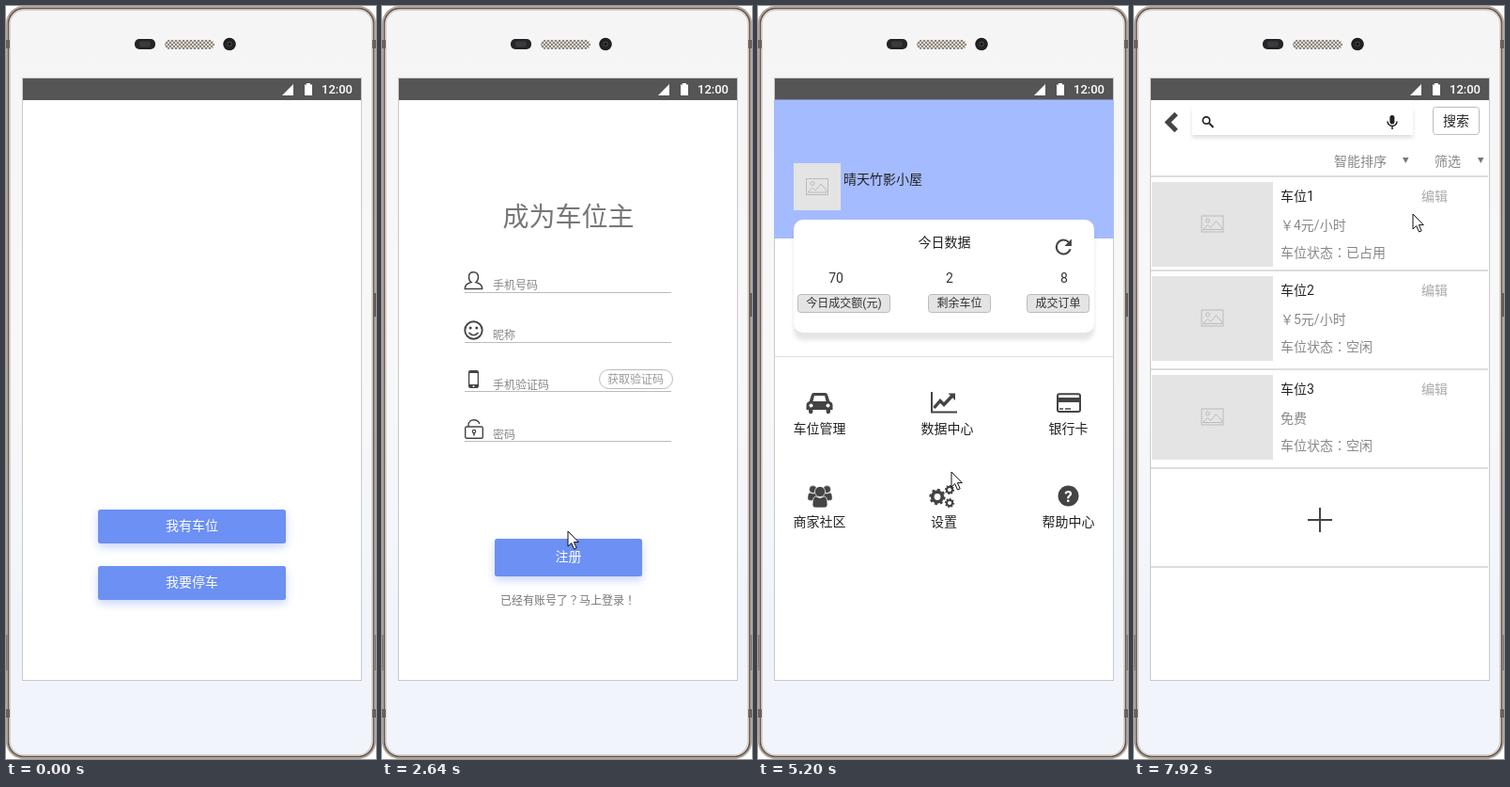
Recreate the animation shown at these times as an HTML page. Size 394x800 px, loop 8 s.

```html
<!DOCTYPE html>
<html lang="zh-CN">
<head>
<meta charset="utf-8">
<title>车位应用演示</title>
<style>
html, body { margin: 0; height: 100%; overflow: hidden; background: #fff; }
svg { display: block; width: 100vw; height: 100vh; }
text { font-family: Roboto, "Noto Sans CJK SC", "Noto Sans CJK", sans-serif; }
.mid { font-family: "Noto Sans CJK TC", "Noto Sans CJK", sans-serif; }
.button { filter: drop-shadow(0 4px 5px #6c90f360); }
.raised { filter: drop-shadow(0 3px 2px #0002); }
.card { filter: drop-shadow(0 8px 2px #0000001a); }
</style>
</head>
<body>
<svg id="stage" viewBox="0 0 394 800" preserveAspectRatio="none"></svg>
<script>
const INK = '#444', GREY = '#777', PALE = '#bbb';

// Text is placed by its vertical centre; wide punctuation sits mid-cell.
const text = (x, cy, value, size = 14, fill = '#222', more = '') =>
  `<text x="${x}" y="${cy + size * 0.37}" font-size="${size}" fill="${fill}" ${more}>` +
  value.replace(/[？！：]/g, '<tspan class="mid" lang="zh-TW">$&</tspan>') + '</text>';
const centered = (x, cy, value, size, fill, more = '') =>
  text(x, cy, value, size, fill, `text-anchor="middle" ${more}`);
const title = value => centered(198.5, 224, value, 28, GREY, 'font-weight="500"');
const rect = (x, y, w, h, fill, more = '') =>
  `<rect x="${x}" y="${y}" width="${w}" height="${h}" fill="${fill}" ${more}/>`;
const circle = (x, y, r, fill, more = '') =>
  `<circle cx="${x}" cy="${y}" r="${r}" fill="${fill}" ${more}/>`;
const stroke = (d, color = INK, width = 1, more = '') =>
  `<path d="${d}" fill="none" stroke="${color}" stroke-width="${width}" ${more}/>`;
const shape = (d, fill = INK, more = '') => `<path d="${d}" fill="${fill}" ${more}/>`;
const at = (x, y, content, scale = 1) =>
  `<g transform="translate(${x} ${y}) scale(${scale})">${content}</g>`;
const rule = (x1, x2, y, color = PALE, width = 1) => stroke(`M${x1} ${y}H${x2}`, color, width);
const button = (x, y, w, h, label) =>
  rect(x, y, w, h, '#6c90f3', 'rx="2.5" class="button"') +
  centered(x + w / 2, y + h / 2 - 0.8, label, 14, '#fff', 'font-weight="500"');

const user = (x, y) => at(x, y,
  stroke('M10 .8C6.5 .8 5 3.2 5 6C5 8.500 6.200 10.600 7.500 11.500C3.500 12.500 .8 14.500 .8 18.500H19.200C19.200 14.500 16.500 12.500 12.500 11.500C13.800 10.600 15 8.500 15 6C15 3.200 13.500 .8 10 .8Z', INK, 1.5));
const lock = (x, y) => at(x, y,
  rect(0.7, 8, 18.6, 12.3, 'none', `rx="1.5" stroke="${INK}" stroke-width="1.4"`) +
  stroke('M4 8V6.500C4 2.500 6.500 .8 9.500 .8C13 .8 15.200 2.500 15.800 5', INK, 1.4) +
  circle(10, 13, 1.7, 'none', `stroke="${INK}" stroke-width="1.2"`) + stroke('M10 14.500V17.500', INK, 1.6));
const smiley = (x, y) => at(x, y,
  circle(0, 0, 9.2, 'none', `stroke="${INK}" stroke-width="1.9"`) +
  circle(-3.3, -2.5, 1.5, INK) + circle(3.3, -2.5, 1.5, INK) + stroke('M-5 2.500Q0 8 5 2.500', INK, 1.7));
const handset = (x, y) =>
  rect(x, y, 11, 19, INK, 'rx="2"') + rect(x + 1.3, y + 3, 8.4, 12, '#fff') + circle(x + 5.5, y + 17, 1, '#fff');
const picture = (x, y) => at(x, y,
  rect(0.5, 0.5, 23, 17, 'none', 'stroke="#bbb"') + circle(7, 5.5, 2, 'none', 'stroke="#bbb"') +
  stroke('M2 15L7 10L10 13L16 6L22 13V15Z', '#bbb'));
const car = (x, y) => at(x, y,
  shape('M8 0H20Q22 0 22.600 2L24.800 9Q28 10 28 13V18H25.500V20a2.200 2.200 0 0 1-4.400 0V18H6.900V20a2.200 2.200 0 0 1-4.400 0V18H0V13Q0 10 3.200 9L5.400 2Q6 0 8 0ZM8.500 3L7 9H21L19.500 3Z', INK, 'fill-rule="evenodd"') +
  circle(5, 13.5, 2, '#fff') + circle(23, 13.5, 2, '#fff'));
const gear = (x, y, r) =>
  circle(x, y, r * 0.62, 'none', `stroke="${INK}" stroke-width="${r * 0.44}"`) +
  circle(x, y, r * 0.88, 'none', `stroke="${INK}" stroke-width="${r * 0.28}" pathLength="16" stroke-dasharray="1 1"`);
const person = (x, y, s) => at(x, y,
  circle(0, 0, 5.6, INK, 'stroke="#fff" stroke-width=".7"') +
  shape('M-5 5Q0 8 5 5Q8 6 8 14Q8 17 5 17H-5Q-8 17-8 14Q-8 6-5 5Z', INK, 'stroke="#fff" stroke-width=".7"'), s);

function phone() {
  const mark = y => rect(0, y, 4, 9, '#6b625c') + rect(390, y, 4, 9, '#6b625c');
  const edge = (inset, radius, color, width) =>
    rect(inset, inset, 394 - 2 * inset, 800 - 2 * inset, 'none', `rx="${radius}" stroke="${color}" stroke-width="${width}"`);
  return `<defs>
    <linearGradient id="body" x2="0" y2="1"><stop stop-color="#f5f5f5"/><stop offset=".45" stop-color="#f8f8f8"/><stop offset=".8" stop-color="#f1f5fb"/></linearGradient>
    <pattern id="mesh" width="4" height="4" patternUnits="userSpaceOnUse"><circle cx="1" cy="1" r=".9" fill="#645c56"/><circle cx="3" cy="3" r=".9" fill="#645c56"/></pattern></defs>` +
    rect(1, 1, 392, 798, 'url(#body)', 'rx="17"') +
    edge(0.8, 18, '#b5a89c', 1.8) + edge(2.6, 16, '#62574f', 1.8) + edge(4.2, 15, '#d9d0c7', 1.4) +
    mark(36) + mark(747) + rect(392, 305, 2, 25, '#655e58') + rect(0, 668, 1.5, 38, '#827a75') + rect(392.5, 668, 1.5, 38, '#827a75') +
    rect(137, 35, 22, 11, '#252527', 'rx="5"') + rect(142, 37.5, 12, 6, '#3a3a3d', 'rx="2"') +
    rect(169, 36, 53, 10, '#e2dcd6', 'rx="5"') + rect(169, 36, 53, 10, 'url(#mesh)', 'rx="5"') +
    circle(238, 40.5, 6.8, '#202022') + circle(238, 40.5, 3, '#3c3c40') + circle(238, 40.5, 1.4, '#111') +
    rect(17.5, 76.5, 361, 640, '#fff', 'stroke="#c9c9c9"') + rect(18, 77, 360, 23, '#555') +
    shape('M294 95H306V83Z', '#fff') + shape('M318 83.500H320V82H324V83.500H326V95H318Z', '#fff') +
    text(336, 88.5, '12:00', 13, '#fff', 'font-weight="500"');
}

const home = () => button(98, 535, 200, 36, '我有车位') + button(98, 595, 200, 36, '我要停车');

const login = () =>
  title('车位主登录') +
  user(83.5, 288) + text(118, 297.5, '账号/手机号码', 12, '#888') + rule(116, 308, 305.5) +
  lock(84, 350) + text(118, 360.5, '密码', 12, '#888') + rule(116, 308, 369.5) +
  text(256, 380, '忘记密码', 12, GREY) +
  button(120, 485, 157, 40, '登录') + text(134, 552.5, '还没有账号？马上注册！', 12, GREY) +
  rule(48, 358, 633.5, '#c4c4c4') + text(150, 648.5, '使用以下账号登录', 12, GREY) +
  [112, 198, 282].map(x => circle(x, 677.5, 12, INK)).join('');

const register = () =>
  title('成为车位主') +
  user(87.5, 282) + smiley(97.5, 344.5) + handset(92, 387) + lock(88, 439) +
  ['手机号码', '昵称', '手机验证码', '密码'].map((label, i) =>
    text(118, 297 + i * 52.7, label, 12, '#888') + rule(88, 308, [304.5, 357.5, 409.5, 462.5][i])).join('') +
  rect(231.5, 386.5, 78, 20, '#fff', 'rx="10" stroke="#bbb"') + text(240, 397, '获取验证码', 12, '#999') +
  button(120, 566, 157, 40, '注册') + text(126, 632, '已经有账号了？马上登录！', 12, GREY);

function dashboard() {
  const chip = (x, w, valueX, value, label) =>
    centered(valueX, 288.5, value, 14, '#333') +
    rect(x + 0.5, 306.5, w - 1, 19, '#e4e4e4', 'rx="3" stroke="#bbb"') + centered(x + w / 2, 316, label, 12, '#333');
  const label = (x, y, value) => centered(x, y, value, 14, '#222');
  return rect(17, 99.5, 362, 147.5, '#a5bbff') + rect(38, 167, 50, 50, '#e4e4e4') + picture(51, 183) +
    text(91, 183.5, '晴天竹影小屋') +
    rect(38, 227, 320, 120, '#fff', 'rx="10" class="card"') +
    centered(198.5, 251, '今日数据', 14, '#222') +
    at(312.5, 243.2, shape('M17.650 6.350A8 8 0 0 0 12 4a8 8 0 1 0 7.730 10h-2.080A6 6 0 1 1 12 6c1.660 0 3.140.690 4.220 1.780L13 11h7V4z'), 1.07) +
    chip(42, 99, 83, '70', '今日成交额(元)') + chip(181, 67, 204, '2', '剩余车位') + chip(286, 67, 326, '8', '成交订单') +
    rule(18, 378, 372.5, '#ddd') +
    car(51.5, 411) +
    stroke('M185 410V431.500H212', INK, 2) + stroke('M187.500 427L194 419.500L198 423.500L207 414', INK, 3.4) + shape('M202.500 411.500H210V419Z') +
    rect(319, 412.2, 24, 18.8, 'none', `rx="2" stroke="${INK}" stroke-width="2"`) + rect(318, 416, 26, 5, INK) + stroke('M321 428H325M327 428H333', INK, 1.6) +
    person(58.5, 513.5, 0.7) + person(73.5, 513.5, 0.7) + person(66, 516, 1) +
    gear(191, 521.5, 8.5) + gear(204, 514, 5) + gear(204, 528, 5) +
    circle(330.5, 520.5, 11, INK) + centered(330.5, 520.5, '?', 17, '#fff', 'font-weight="700"') +
    label(65.5, 448.5, '车位管理') + label(201.5, 448.5, '数据中心') + label(330.5, 449, '银行卡') +
    label(65.5, 547.5, '商家社区') + label(198, 547.5, '设置') + label(330.5, 547.5, '帮助中心');
}

function spaces() {
  const row = (y, name, price, state) =>
    rect(19, y, 129, 90, '#e4e4e4') + picture(71.5, y + 35.5) +
    text(156, y + 15, name) + text(306, y + 15, '编辑', 14, '#aaa') +
    text(156, y + 45.5, price, 14, '#888') + text(156, y + 75, '车位状态：' + state, 14, '#888');
  return stroke('M45 114.500L36 123.500L45 132.500', INK, 5) +
    rect(62, 108, 235, 29, '#fff', 'class="raised"') +
    circle(77, 121.5, 3.7, 'none', 'stroke="#222" stroke-width="1.7"') + stroke('M80 124.500L84.500 129', '#222', 2) +
    rect(272.4, 116, 5, 9.5, '#222', 'rx="2.5"') + stroke('M270 122.500A5 5 0 0 0 280 122.500M275 127.500V131', '#222', 1.5) +
    rect(318.5, 107.5, 49, 29, '#fff', 'rx="3" stroke="#bbb"') + text(329, 121.5, '搜索') +
    text(213, 165, '智能排序', 14, '#888') + shape('M286 161H292.500L289.250 167Z', '#777') +
    text(320, 165, '筛选', 14, '#888') + shape('M366 161H372.500L369.250 167Z', '#777') +
    [181, 281, 386, 491, 596].map(y => rule(18, 377, y, '#ddd', 2)).join('') +
    row(187, '车位1', '￥4元/小时', '已占用') + row(287, '车位2', '￥5元/小时', '空闲') + row(392, '车位3', '免费', '空闲') +
    stroke('M185 546H211M198 533V559', INK, 2);
}

// Each scene: start time, drawing, and clickable areas [x1, y1, x2, y2].
const loginAreas = [[120, 485, 277, 525], [134, 545, 268, 560]];
const scenes = [
  [0, home, [[98, 535, 298, 571], [98, 595, 298, 631]]],
  [960, login, loginAreas],
  [2160, register, [[120, 566, 277, 606], [126, 624, 270, 640]]],
  [3840, login, loginAreas],
  [5040, dashboard, [[38, 410, 94, 457]]],
  [7200, spaces, [[306, 194, 334, 210]]],
];
// Pointer tip: time, x, y.
const path = [
  [0, 420, 810], [80, 385, 690], [640, 214, 554], [1120, 214, 554], [1600, 199, 551],
  [2480, 199, 551], [3360, 188, 627], [3920, 188, 627], [4560, 217, 522], [4800, 206, 495],
  [5760, 206, 495], [6640, 62, 438], [7280, 62, 438], [7920, 297, 221], [8000, 297, 221],
];

const hand = shape('M-1.800 1.800C-1.800-.6 1.800-.6 1.800 1.800V8.500C2.600 7.400 4.700 7.700 4.900 9.200C6 8.300 7.900 8.700 8 10.200C9.300 9.600 11 10.300 11 12V16C11 19 9.500 20 9 23.500H-.5C-1 20.500-3.500 18.500-5.800 14.500C-7 12.300-4.600 11.300-3.200 13L-1.800 14.700Z', '#fff', 'stroke="#111" stroke-width="1.1"') +
  stroke('M1.800 8.500V12.500M4.900 9.200V12.500M8 10.200V13', '#111');
const arrow = shape('M0 0V16L3.700 12.600L6.500 19L9.200 17.800L6.400 11.600H11.300Z', '#fff', 'stroke="#111"');

const stage = document.getElementById('stage');
stage.innerHTML = phone() + scenes.map(([, draw]) => `<g class="scene">${draw()}</g>`).join('') +
  `<g id="pointer"><g>${hand}</g><g>${arrow}</g></g>`;
const layers = [...stage.querySelectorAll('.scene')];
const pointer = document.getElementById('pointer');
const show = (node, visible) => { node.style.display = visible ? '' : 'none'; };

function pointerAt(t) {
  const next = path.findIndex(key => key[0] > t);
  const [t0, x0, y0] = path[next - 1], [t1, x1, y1] = path[next];
  const u = (t - t0) / (t1 - t0), eased = u * u * (3 - 2 * u);
  return [x0 + (x1 - x0) * eased, y0 + (y1 - y0) * eased].map(Math.round);
}

function render(now) {
  const t = Math.floor((now % 8000) / 80) * 80;
  const current = scenes.findLastIndex(scene => scene[0] <= t);
  layers.forEach((layer, i) => show(layer, i === current));
  const [x, y] = pointerAt(t);
  const clickable = scenes[current][2].some(([x1, y1, x2, y2]) => x >= x1 && x <= x2 && y >= y1 && y <= y2);
  pointer.setAttribute('transform', `translate(${x} ${y})`);
  show(pointer.children[0], clickable);
  show(pointer.children[1], !clickable);
}

const start = performance.now();
function tick() {
  render(performance.now() - start);
  requestAnimationFrame(tick);
}
tick();
</script>
</body>
</html>
```
